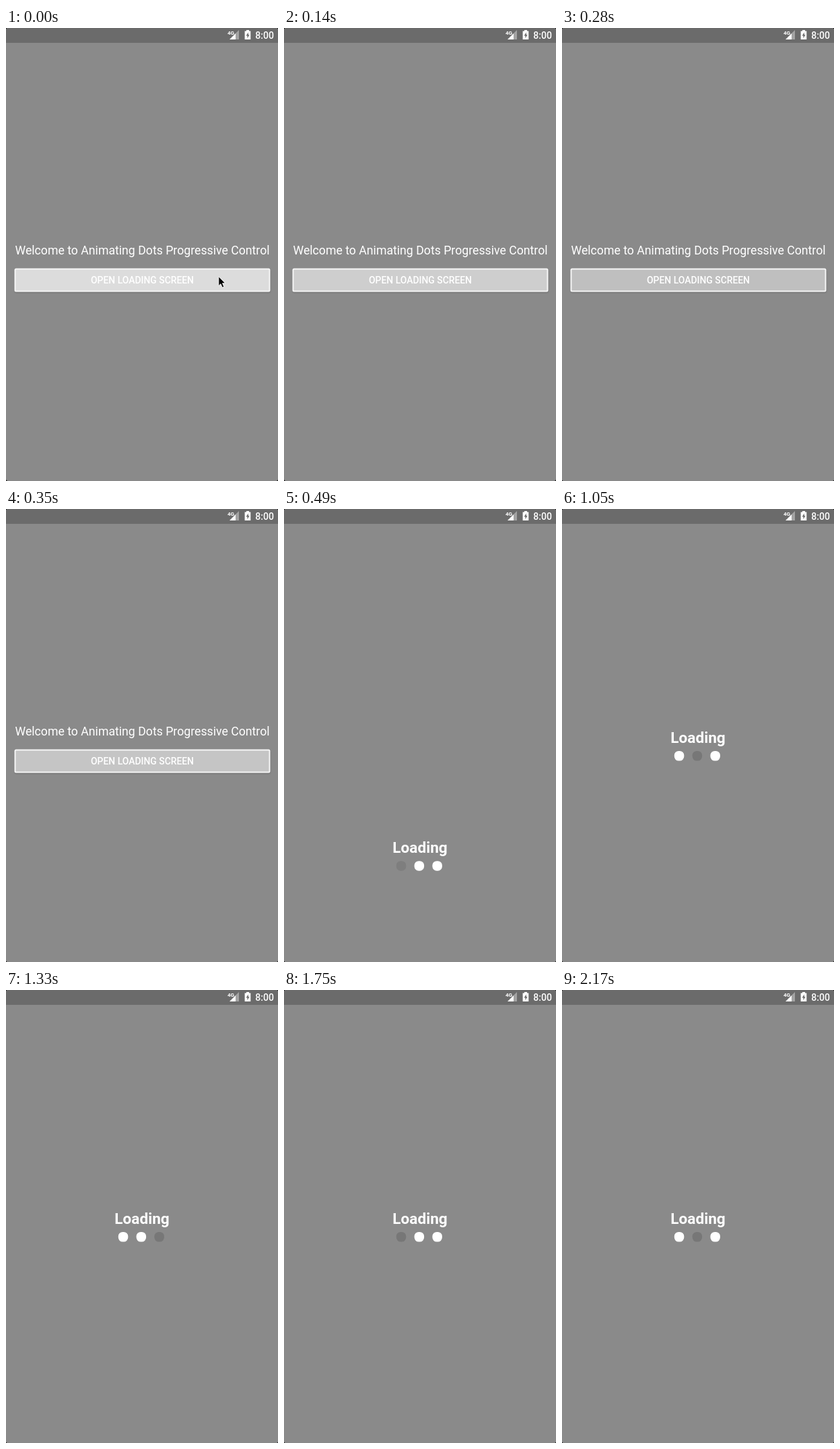
An HTML page for the animation above (2310 ms loop, 404x672 px).

```html
<!DOCTYPE html>
<html lang="en">
<head>
<meta charset="utf-8">
<title>Loading screen</title>
<style>
  html, body { margin: 0; width: 100%; height: 100%; overflow: hidden; background: #000; }
  svg { display: block; width: 404px; height: 672px; }
  text { font-family: Roboto, sans-serif; fill: #fff; }
  .mid { text-anchor: middle; }
</style>
</head>
<body>
<svg viewBox="0 0 404 672">
  <defs>
    <clipPath id="screen"><rect width="404" height="672" rx="3"/></clipPath>
    <filter id="soft" x="-5%" y="-30%" width="110%" height="160%"><feGaussianBlur stdDeviation="0.9"/></filter>
  </defs>
  <g clip-path="url(#screen)">
    <rect width="404" height="672" fill="#8a8a8a"/>

    <text class="mid" x="202.5" y="335.5" font-size="17.7">Welcome to Animating Dots Progressive Control</text>
    <rect x="13" y="358" width="379.5" height="34.5" rx="2" fill="#555" opacity=".55" filter="url(#soft)"/>
    <rect id="button" x="13.5" y="357.5" width="378" height="33" rx="1.5" stroke="#f6f6f6" stroke-width="2"/>
    <text class="mid" x="202.5" y="379.3" font-size="13.9" font-weight="500">OPEN LOADING SCREEN</text>
    <path id="cursor" d="M315.8 368.6v14l3.1-2.9 2.4 5.2 2.5-1.1-2.3-5.1h4.3z" fill="#000" stroke="#fff" stroke-width=".9"/>

    <g id="page">
      <rect y="22" width="404" height="650" fill="#8a8a8a"/>
      <text class="mid" x="202" y="347" font-size="22.6" font-weight="700">Loading</text>
      <g id="dots">
        <rect x="166.8" y="359" width="14.5" height="14.5" rx="6.4"/>
        <rect x="193.6" y="359" width="14.5" height="14.5" rx="6.4"/>
        <rect x="220.4" y="359" width="14.5" height="14.5" rx="6.4"/>
      </g>
    </g>

    <rect width="404" height="22" fill="#6b6b6b"/>
    <text x="329" y="9.8" font-size="8" font-weight="700" textLength="auto">4G</text>
    <path d="M346 3v14h-5V8z" fill="#a3a3a3"/>
    <path d="M341 8v9h-9z" fill="#fff"/>
    <path d="M357 3h4v1.4h2.3V17h-8.7V4.4H357z" fill="#fff"/>
    <path d="M359.8 6.6l-3.2 5h1.9v3.6l3-5.1h-1.7z" fill="#6b6b6b"/>
    <text x="370.3" y="15.6" font-size="14" font-weight="500">8:00</text>
  </g>
</svg>
<script>
  const LOOP = 2310, STEP = 70;
  const SLIDE = { start: 193, length: 446, height: 650 };
  const FALL = 280, RISE = 210;
  // Each dot goes dark at one time and is white again at the next.
  const dims = [[[505, 910], [1750, 2170]], [[910, 1330], [2170, 2590]], [[1330, 1750]]];

  const $ = id => document.getElementById(id);
  const button = $('button'), cursor = $('cursor'), page = $('page');
  const dots = [...$('dots').children];
  const clamp = v => Math.min(1, Math.max(0, v));
  const ramp = (t, start, length) => clamp((t - start) / length);
  const mix = (a, b, p) => a + (b - a) * p;
  const gray = v => { const n = Math.round(v); return `rgb(${n},${n},${n})`; };

  const brightness = (t, spans) => Math.min(...spans.map(([dark, lit]) =>
    Math.max(1 - ramp(t, dark - FALL, FALL), ramp(t, lit - RISE, RISE))));

  function draw(t) {
    const press = ramp(t, 0, 280) - 0.4 * ramp(t, 280, 140);
    button.setAttribute('fill', gray(mix(220, 191, press)));
    cursor.style.visibility = t < STEP ? 'visible' : 'hidden';

    const p = ramp(t, SLIDE.start, SLIDE.length);
    const y = SLIDE.height * (1 + Math.cos(Math.PI * p)) / 2;
    page.setAttribute('transform', `translate(0 ${y.toFixed(2)})`);

    dots.forEach((dot, i) => dot.setAttribute('fill', gray(mix(119, 255, brightness(t, dims[i])))));
  }

  const origin = performance.now();
  function tick() {
    const t = (performance.now() - origin) % LOOP;
    draw(Math.floor(t / STEP) * STEP);
    requestAnimationFrame(tick);
  }
  draw(0);
  requestAnimationFrame(tick);
</script>
</body>
</html>
```
